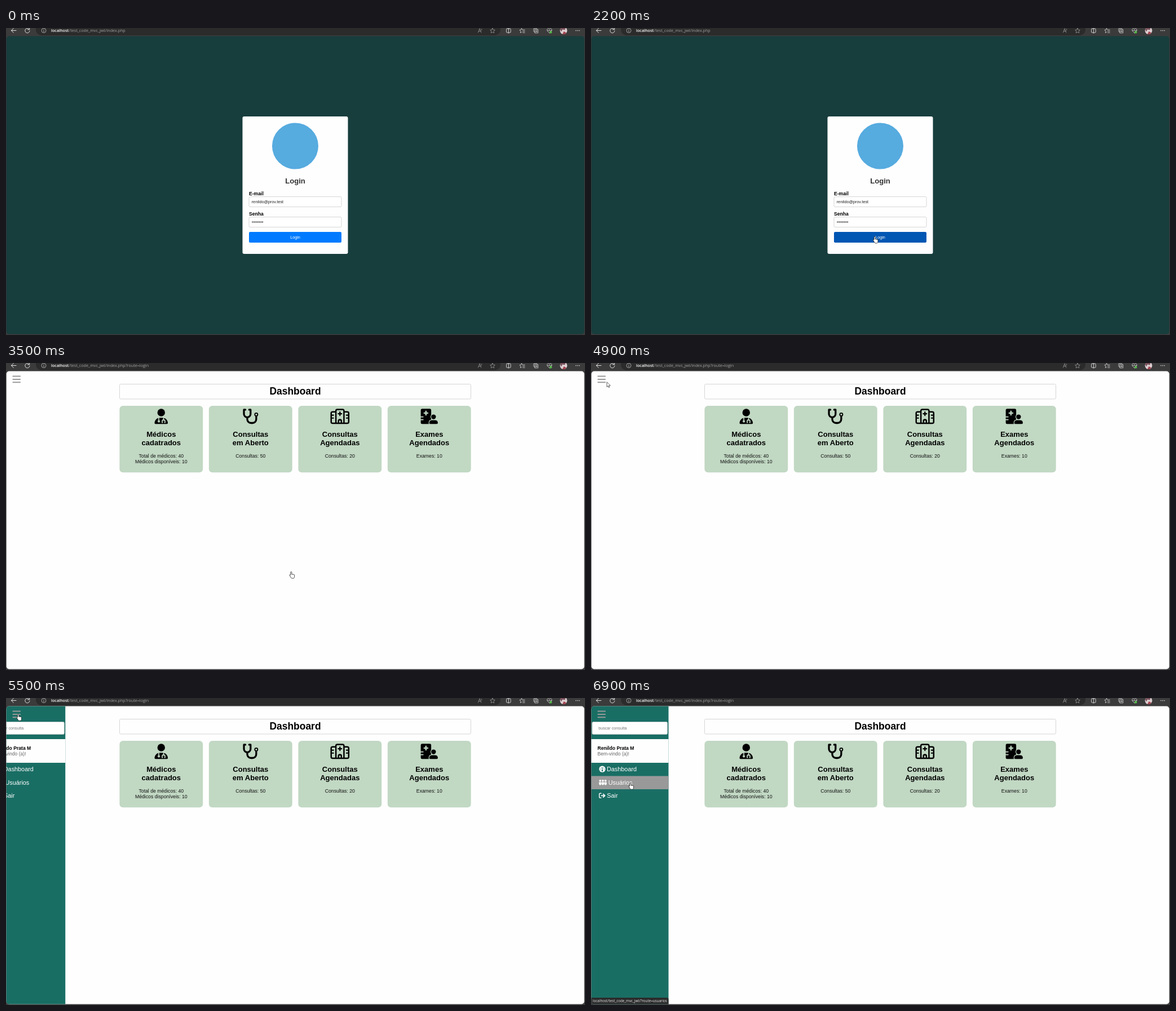
Write an HTML page that moves like this. It is 1027 px wide and 545 px high and loops after 8000 ms.

```html
<!DOCTYPE html>
<html lang="pt">
<head>
<meta charset="utf-8">
<title>Login e dashboard</title>
<style>
  html, body { margin: 0; width: 100%; height: 100%; overflow: hidden; background: #3b3b3b; }
  svg { display: block; width: 1027px; height: 545px; }
  text { font-family: "Liberation Sans", Arial, sans-serif; white-space: pre; }
  .ui { font-family: "Open Sans", "Noto Sans", sans-serif; }
  .line { fill: none; stroke-linecap: round; stroke-linejoin: round; }
</style>
</head>
<body>
<svg id="stage" viewBox="0 0 1027 545"></svg>
<script>
const CARD = '#c1d8c3';

function text(x, y, size, content, { fill = '#000', bold = false, middle = false, ui = false } = {}) {
  return `<text x="${x}" y="${y}" font-size="${size}" fill="${fill}"` +
    `${bold ? ` font-weight="${ui ? 600 : 700}"` : ''}${middle ? ' text-anchor="middle"' : ''}` +
    `${ui ? ' class="ui"' : ''}>${content}</text>`;
}
function box(x, y, w, h, r, fill, stroke = 'none') {
  return `<rect x="${x}" y="${y}" width="${w}" height="${h}" rx="${r}" fill="${fill}" stroke="${stroke}" stroke-width=".8"/>`;
}
function line(d, width, color = '#000') {
  return `<path class="line" d="${d}" stroke="${color}" stroke-width="${width}"/>`;
}
function disc(x, y, r, fill) {
  return `<circle cx="${x}" cy="${y}" r="${r}" fill="${fill}"/>`;
}

function toolbar() {
  const gray = '#c4c4c4';
  return box(53, -14, 824, 27, 10, '#2b2b2b') +
    line('M18 4.5H9.5M13.3 .6L9.4 4.5l3.9 3.9', 1, '#e0e0e0') +
    `<g id="reload">${line('M41.4 2.6A4.1 4.1 0 1 0 42 5M41.7 -.5v3.3h-3.2', 1, '#e0e0e0')}</g>` +
    `<g id="stop">${line('M34.5 1.2l7 7M41.5 1.2l-7 7', 1, '#e0e0e0')}</g>` +
    `<circle cx="67" cy="4.5" r="4" fill="none" stroke="${gray}" stroke-width=".8"/>` +
    line('M67 4.3v2.2M67 2.5v.1', .9, gray) +
    text(80, 7.2, 7.15, 'localhost', { fill: '#fff', bold: true, ui: true }) +
    `<text id="path" class="ui" x="111.6" y="7.2" font-size="7.15" fill="#a2a2a2"></text>` +
    line('M837.5 8l2.7-7 2.7 7M838.5 5.7h3.6M843.3 1.5q1.5 1 0 2.5', .7, '#aaa') +
    line('M863 .4l1.3 2.8 3 .4-2.2 2.1.6 3.1-2.7-1.5-2.7 1.5.6-3.1-2.2-2.1 3-.4z', .7, '#aaa') +
    line('M888.8 1.2h5.2a1.2 1.2 0 0 1 1.2 1.2v4.6a1.2 1.2 0 0 1-1.2 1.2h-5.2a1.2 1.2 0 0 1-1.2-1.2v-4.6a1.2 1.2 0 0 1 1.2-1.2M891.4 .3v9', .9, '#ddd') +
    line('M914.5 .8l1.2 2.4h4.4M914.5 .8l-1.2 2.4-2.3.4 1.8 2-.4 3 2.2-1.3M916.5 5.7h3.7M916.5 8.2h3.7', .8, '#ddd') +
    line('M938.3 6.8h-1.1q-1.2 0-1.2-1.2v-4q0-1 1-1h3.8q1 0 1 1M938.3 2.6h5.4v6.2h-5.4zM941 4.2v3M939.5 5.7h3', .8, '#ddd') +
    line('M964 9l-3.7-3.8c-2-2.5 1.5-6 3.7-3.2 2.2-2.8 5.7.7 3.7 3.2zM960.8 4.6h2l1-1.5 1.4 2.6.8-1.1h1.8', .8, '#ddd') +
    disc(966.3, 7.4, 2.2, '#54b948') +
    disc(989, 4.6, 6.4, '#dccfd2') +
    `<path d="M983 2.5a6.4 6.4 0 0 1 10-3l-2 4-4-1-2 4z" fill="#77505a"/>` +
    `<path d="M987 11l2.5-5 4.5 2.5a6.4 6.4 0 0 1-7 2.5z" fill="#a3444f"/>` +
    [1011, 1014, 1017].map(x => disc(x, 4.6, .8, '#e0e0e0')).join('');
}

function field(y, label) {
  return text(431, y - 2.5, 8.6, label, { bold: true }) + box(431, y, 164, 18, 2, '#fff', '#ccc');
}

function loginPage() {
  const dots = Array.from({ length: 8 }, (_, i) => disc(437.2 + i * 2.57, 344.4, .95, '#111')).join('');
  return box(0, 14, 1027, 531, 0, '#183d3d') +
    box(419.5, 157, 187, 244, 3, '#fefefe') +
    disc(513, 209.5, 41, '#56abdf') +
    text(513, 275.8, 13.1, 'Login', { fill: '#333', bold: true, middle: true }) +
    field(299.5, 'E-mail') + text(435.7, 311, 7.25, 'renildo@prov.test', { fill: '#222' }) +
    field(335.5, 'Senha') + dots +
    `<rect id="submit" x="431" y="362" width="164" height="19" rx="2"/>` +
    text(513, 373.9, 7.25, 'Login', { fill: '#fff', middle: true });
}

// Card icons live in a 512-unit-high space.
const icons = {
  doctor: [448, '<circle cx="224" cy="128" r="128"/>' +
    '<path d="M0 482C0 384 80 304 178 304h92c98 0 178 80 178 178q0 30-30 30H30Q0 512 0 482z"/>' +
    line('M144 296v96M304 296v90M268 464h-12v-42a48 48 0 0 1 96 0v42h-12', 32, CARD) + disc(144, 424, 40, CARD) + disc(144, 424, 8, '#000')],
  stethoscope: [576, line('M112 32H64v144a112 112 0 0 0 224 0V32h-48M176 300v52a128 128 0 0 0 128 128h48a128 128 0 0 0 128-128V250', 62) +
    '<circle cx="480" cy="192" r="48" fill="none" stroke="#000" stroke-width="36"/>'],
  hospital: [640, line('M184 104H72q-48 0-48 48v288q0 48 48 48h496q48 0 48-48V152q0-48-48-48H456M184 488V72q0-48 48-48h176q48 0 48 48v416M272 488v-72a48 48 0 0 1 96 0v72', 48) +
    line('M320 112v112M264 168h112', 44) + line('M40 216h60M40 312h60M540 216h60M540 312h60', 40)],
  patients: [576, '<path d="M48 0h256q48 0 48 48v464H48Q0 512 0 464V48Q0 0 48 0z"/>' +
    line('M176 84v120M116 144h120', 46, CARD) + line('M0 272h80M0 368h80', 32, CARD) +
    `<g stroke="${CARD}" stroke-width="44" paint-order="stroke"><circle cx="432" cy="272" r="80"/>` +
    '<path d="M288 480q0-96 96-96h96q96 0 96 96 0 32-32 32H320q-32 0-32-32z"/></g>'],
};

function card(index, icon, title, details) {
  const x = 201.4 + index * 158.5, mid = x + 73.9, [width, art] = icons[icon], scale = .0525;
  return box(x, 76, 147.8, 118.2, 6, CARD) +
    `<g transform="translate(${mid - width * scale / 2} 81.3) scale(${scale})">${art}</g>` +
    title.map((s, i) => text(mid, 130.5 + i * 15.4, 13.05, s, { bold: true, middle: true })).join('') +
    details.map((s, i) => text(mid, 168 + i * 9.6, 8.7, s, { fill: '#111', middle: true })).join('');
}

function sidebar() {
  const people = [16.3, 21, 25.7].map(x => disc(x, 146.8, 1.9, '#fff') +
    `<path d="M${x - 2.1} 149.6h4.2v3.2l-1 1.6h-2.2l-1-1.6z" fill="#fff"/>`).join('');
  const white = { fill: '#fff' };
  return `<g id="side">` + box(0, 14, 137.5, 531, 0, '#196e64') +
    box(2, 42.5, 133.5, 22, 2, '#fff', '#ccc') +
    text(13.2, 56, 7.2, 'buscar consulta', { fill: '#757575' }) +
    box(0, 73, 137.5, 42, 0, '#fefefe') +
    text(11.5, 92, 8.6, 'Renildo Prata M', { bold: true }) +
    text(11.5, 101.7, 8.6, 'Bem-vindo (a)!', { fill: '#666' }) +
    `<rect id="hover" x="0" width="137.5" height="23.5" fill="#999"/>` +
    disc(20, 126.2, 5.6, '#fff') + line('M20 129v-6', 1.1, '#196e64') + disc(20, 129, 1.3, '#196e64') +
    [[16.7, 126.2], [17.7, 123.8], [22.3, 123.8], [23.3, 126.2]].map(([x, y]) => disc(x, y, .6, '#196e64')).join('') +
    people + line('M18 169.3h-1.8q-1.5 0-1.5 1.5v5q0 1.5 1.5 1.5H18', 1.4, '#fff') +
    line('M18.5 173.3h5.5M21.8 170.5l2.9 2.8-2.9 2.8', 1.7, '#fff') +
    text(28, 130.1, 10.85, 'Dashboard', white) + text(30.7, 153.7, 10.85, 'Usuários', white) +
    text(28.3, 177.1, 10.85, 'Sair', white) + '</g>';
}

function dashboardPage() {
  return box(0, 14, 1027, 531, 0, '#fefefe') +
    box(201.5, 37.5, 623, 26.4, 2, '#fefefe', '#ccc') +
    text(513, 56.2, 17.45, 'Dashboard', { bold: true, middle: true }) +
    card(0, 'doctor', ['Médicos', 'cadatrados'], ['Total de médicos: 40', 'Médicos disponíveis: 10']) +
    card(1, 'stethoscope', ['Consultas', 'em Aberto'], ['Consultas: 50']) +
    card(2, 'hospital', ['Consultas', 'Agendadas'], ['Consultas: 20']) +
    card(3, 'patients', ['Exames', 'Agendados'], ['Exames: 10']) +
    sidebar() +
    [22.6, 27.9, 33.2].map(y => box(11.5, y, 14.5, 2, .7, '#999')).join('') +
    `<g id="status">${box(-5, 532, 142.5, 20, 3, '#2b2b2b')}` +
    text(3, 540.4, 6.25, 'localhost/test_code_mvc_jwt/?route=usuarios', { fill: '#e8e8e8', ui: true }) + '</g>';
}

document.getElementById('stage').innerHTML =
  '<clipPath id="frame"><rect x=".7" y="14.5" width="1025" height="529" rx="5"/></clipPath>' +
  box(0, 0, 1027, 545, 0, '#3b3b3b') + toolbar() +
  `<g clip-path="url(#frame)"><g id="login">${loginPage()}</g><g id="dash">${dashboardPage()}</g></g>` +
  '<path id="arrow" d="M.4 .4v8.8l2.1-1.9 1.3 3 1.4-.6-1.3-2.9h2.8z" fill="#fff" stroke="#222" stroke-width=".7"/>' +
  '<path id="hand" d="M3 .6c-.8 0-1.1.5-1.1 1.2v4.6L1.2 6c-.7-.4-1.4.4-.9 1.1l2.6 4.2c.4.6.9.9 1.6.9h2c1.5 0 2.3-1 2.3-2.4V6.5c0-1.2-1.3-1.3-1.6-.6 0-1-1.4-1.2-1.7-.4-.2-.9-1.2-.9-1.4-.2V1.8C4.1 1 3.7.6 3 .6z" fill="#fff" stroke="#111" stroke-width=".75"/>';

const el = Object.fromEntries([...document.querySelectorAll('[id]')].map(node => [node.id, node]));

// Pointer track: time, x, y, shape.
const track = [
  [0, 13, 0, ''], [200, 13, 0, 'arrow'], [600, 270, 190, 'arrow'], [1000, 436, 328, 'arrow'],
  [1100, 436, 328, 'arrow'], [1200, 445, 331.5, 'arrow'], [1300, 445, 331.5, ''],
  [1500, 470, 355, 'arrow'], [1600, 475, 363, 'hand'], [2000, 497.5, 369.5, 'hand'],
  [2100, 497.5, 369.5, 'hand'], [2300, 502.8, 370, 'hand'], [3500, 502.8, 370, 'hand'],
  [3600, 494, 350, 'arrow'], [3800, 430, 260, 'arrow'], [3900, 430, 260, 'arrow'],
  [4100, 231, 138, 'arrow'], [4200, 231, 138, 'arrow'], [4600, 80, 62, 'arrow'],
  [4900, 27.7, 33.3, 'arrow'], [5100, 18.7, 28, 'hand'], [5700, 18.7, 28, 'hand'],
  [5800, 22, 40, 'arrow'], [6100, 42, 96, 'arrow'], [6200, 42, 96, 'arrow'],
  [6500, 55, 122, 'hand'], [6700, 64, 144, 'hand'], [6900, 66.7, 150, 'hand'], [8000, 66.7, 150, 'hand'],
];

const clamp = v => Math.max(0, Math.min(1, v));
const mix = (a, b, p) => a + (b - a) * p;

function pointerAt(t) {
  const i = track.findIndex((key, n) => n + 1 === track.length - 1 || t < track[n + 1][0]);
  const [t0, x0, y0, shape] = track[i], [t1, x1, y1] = track[i + 1];
  const p = clamp((t - t0) / (t1 - t0));
  return { x: mix(x0, x1, p), y: mix(y0, y1, p), shape };
}

// The CSS "ease" curve.
function ease(v) {
  let lo = 0, hi = 1;
  const curve = (s, a, b) => 3 * a * s * (1 - s) ** 2 + 3 * b * s * s * (1 - s) + s ** 3;
  for (let i = 0; i < 24; i++) {
    const s = (lo + hi) / 2;
    if (curve(s, .25, .25) < v) lo = s; else hi = s;
  }
  return curve(lo, .1, 1);
}

const show = (node, on) => node.setAttribute('display', on ? 'inline' : 'none');

function render(t) {
  const loggedIn = t >= 3500, loading = t >= 3400 && !loggedIn;
  show(el.login, !loggedIn);
  show(el.dash, loggedIn);
  show(el.stop, loading);
  show(el.reload, !loading);
  el.path.textContent = '/test_code_mvc_jwt/index.php' + (loggedIn ? '?route=login' : '');

  const lit = ease(clamp((t - 1550) / 300));
  el.submit.setAttribute('fill', `rgb(0,${mix(123, 86, lit)},${mix(255, 179, lit)})`);

  const open = ease(clamp((t - 5267) / 500));
  el.side.setAttribute('transform', `translate(${mix(-138, 0, open)} 0)`);

  const pointer = pointerAt(t);
  for (const shape of ['arrow', 'hand']) {
    show(el[shape], pointer.shape === shape);
    el[shape].setAttribute('transform', `translate(${pointer.x} ${pointer.y})`);
  }
  const row = Math.floor((pointer.y - 115) / 23.5);
  show(el.hover, t > 5800 && row >= 0);
  el.hover.setAttribute('y', 115 + row * 23.5);
  show(el.status, t >= 6700);
}

function tick(now) {
  render(Math.floor(now % 8000 / 100) * 100);
  requestAnimationFrame(tick);
}
render(0);
requestAnimationFrame(tick);
</script>
</body>
</html>
```
